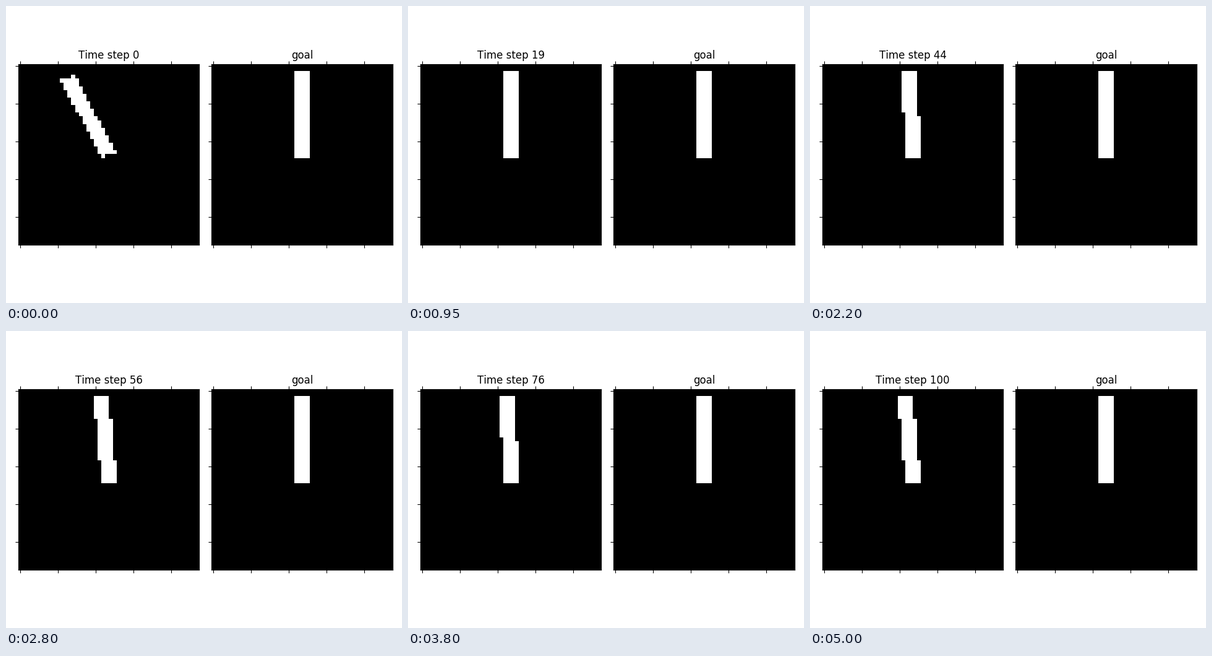
A matplotlib script that plays this animation: 640 px wide and 480 px high, repeating every 5.05 s.

```python
import math

import matplotlib.pyplot as plt
import numpy as np
from matplotlib.animation import FuncAnimation

W, H, DPI = 640, 480, 100
GRID = 48          # cells per side of each picture
PIVOT = 24
LENGTH = 22
STEPS = 101
RISE, SETTLE, HOLD = 10, 22, 28    # steps that end each phase of the swing

plt.rcParams["text.kerning_factor"] = 6


def ease(a, b, u):
    return a + (b - a) * (1 - math.cos(math.pi * min(u, 1))) / 2


def angle_at(step):
    """Degrees from upright: swing up, settle, then wobble with a slow drift."""
    if step < RISE:
        return ease(-30, 10, step / RISE)
    if step < HOLD:
        return ease(10, -0.8, (step - RISE) / (SETTLE - RISE))
    wave = math.sin(math.pi * (step - HOLD) / 8)
    return -0.029 * step + 4.65 * wave + 2.15 * wave ** 2


def half_up(v):
    return int(math.copysign(math.floor(abs(v) + 0.5), v))


def half_down(v):
    return int(math.copysign(math.ceil(abs(v) - 0.5), v))


def rod_corners(x1, y1):
    """Whole-cell corners of a line four cells wide from the pivot."""
    dx, dy = x1 - PIVOT, y1 - PIVOT
    size = math.hypot(dx, dy)
    near_x, far_x = half_down(dy / size), half_up(2 * dy / size)
    near_y, far_y = half_down(dx / size), half_up(2 * dx / size)
    return [(PIVOT - near_x, PIVOT + far_y), (x1 - near_x, y1 + far_y),
            (x1 + far_x, y1 - near_y), (PIVOT + far_x, PIVOT - near_y)]


def rod_image(degrees):
    angle = math.radians(degrees)
    tip_x = int(PIVOT + LENGTH * math.sin(angle))
    tip_y = int(PIVOT - LENGTH * math.cos(angle))
    corners = rod_corners(tip_x, tip_y)
    edges = list(zip(corners, corners[1:] + corners[:1]))
    img = np.zeros((GRID, GRID))
    for row in range(GRID):
        xs = [xa + (xb - xa) * (row - ya) / (yb - ya)
              for (xa, ya), (xb, yb) in edges
              if ya != yb and min(ya, yb) <= row <= max(ya, yb)]
        if xs:
            img[row, half_up(min(xs)):half_down(max(xs)) + 1] = 1
    return img


fig = plt.figure(figsize=(W / DPI, H / DPI), dpi=DPI)

SIDE = 292.6       # panel size in pixels
LEFT, GAP = 19.86, 19.88


def panel(left, title, img):
    ax = fig.add_axes([left / W, (H - SIDE) / 2 / H, SIDE / W, SIDE / H])
    pic = ax.imshow(img, cmap="gray", vmin=0, vmax=1, interpolation="nearest")
    ax.set_xticks(range(0, GRID, 10))
    ax.set_yticks(range(0, GRID, 10))
    ax.tick_params(top=True, labelbottom=False, labelleft=False)
    return pic, ax.set_title(title, y=1)


pic, label = panel(LEFT, "Time step 0", rod_image(angle_at(0)))
panel(LEFT + SIDE + GAP, "goal", rod_image(0))


def draw(step):
    pic.set_data(rod_image(angle_at(step)))
    label.set_text(f"Time step {step}")
    return pic, label


anim = FuncAnimation(fig, draw, frames=STEPS, interval=50, repeat=True,
                     repeat_delay=0, blit=False)
plt.show()
```
